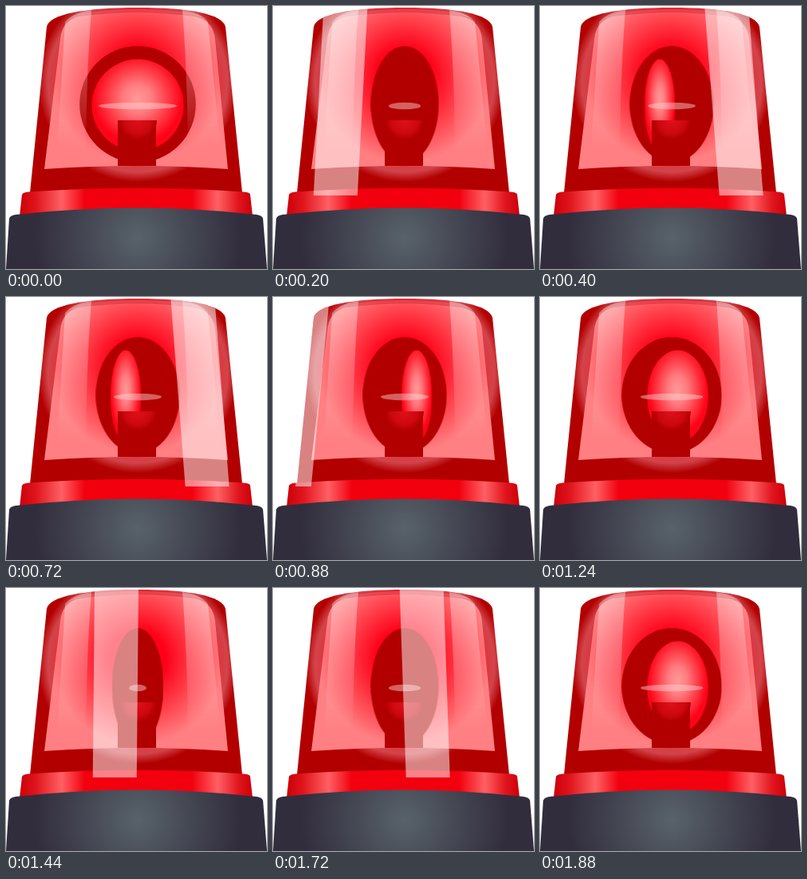
These frames come from a looping animation (327x329 px, 1920 ms). An HTML page without scripts:

```html
<!DOCTYPE html>
<html lang="en">
<head>
<meta charset="utf-8">
<title>Siren</title>
<style>
  html, body { margin: 0; width: 100%; height: 100%; overflow: hidden; background: #fff; }
  svg { display: block; width: 100vw; height: 100vh; }

  /* one turn = 8 poses of 40 ms */
  .head, .lamp, .wire, .beam { animation: 320ms infinite; }
  .head, .wire { animation-timing-function: steps(4, end); }
  .head { animation-name: head; }
  .wire { animation-name: wire; }
  .lamp { animation-name: lamp; animation-timing-function: steps(3, end); }
  .beam { animation-name: beam; animation-timing-function: step-end; }

  @keyframes head {
    0%, 100% { transform: scaleX(1); }
    50% { transform: scaleX(.445); }
  }
  @keyframes wire {
    0%, 100% { transform: scaleX(1); }
    50% { transform: scaleX(.224); }
  }
  @keyframes lamp {
    0% { transform: translateX(0) scaleX(1); }
    37.5% { transform: translateX(-22.5px) scaleX(0); animation-timing-function: step-end; }
    62.5% { transform: translateX(22.5px) scaleX(0); }
    100% { transform: translateX(0) scaleX(1); }
  }
  @keyframes beam {
    0% { opacity: 0; transform: translateX(143px) skewX(6.95deg); }
    12.5% { opacity: 1; transform: translateX(143px) skewX(6.95deg); animation-timing-function: steps(6, end); }
    87.49% { opacity: 1; transform: translateX(-143px) skewX(-8.05deg); }
    87.5%, 100% { opacity: 0; transform: translateX(-143px) skewX(-8.05deg); }
  }
</style>
</head>
<body>
<svg viewBox="0 0 327 329" preserveAspectRatio="none">
  <defs>
    <radialGradient id="body" gradientUnits="userSpaceOnUse" cx="165" cy="95" r="125">
      <stop offset=".5" stop-color="#f00012"/>
      <stop offset=".78" stop-color="#e0303a"/>
      <stop offset=".9" stop-color="#d2444a"/>
      <stop offset="1" stop-color="#b20000"/>
    </radialGradient>
    <radialGradient id="glass" gradientUnits="userSpaceOnUse" cx="165" cy="88" r="108">
      <stop offset=".32" stop-color="#ff0018"/>
      <stop offset=".65" stop-color="#ff3f4a"/>
      <stop offset="1" stop-color="#ff7f82"/>
    </radialGradient>
    <radialGradient id="bulb" cy=".43" r=".52">
      <stop offset="0" stop-color="#ff9a9a"/>
      <stop offset=".3" stop-color="#ff7c80"/>
      <stop offset=".6" stop-color="#ff424c"/>
      <stop offset=".92" stop-color="#ff0419"/>
    </radialGradient>
    <radialGradient id="ember" gradientUnits="userSpaceOnUse" cx="165" cy="143" r="24">
      <stop offset="0" stop-color="#e0101a"/>
      <stop offset=".7" stop-color="#cc080e"/>
      <stop offset="1" stop-color="#b20000"/>
    </radialGradient>
    <linearGradient id="streak" x2="0" y2="1">
      <stop offset="0" stop-color="#fff" stop-opacity=".38"/>
      <stop offset=".5" stop-color="#fff" stop-opacity=".22"/>
      <stop offset="1" stop-color="#fff" stop-opacity="0"/>
    </linearGradient>
    <linearGradient id="collar">
      <stop offset="0" stop-color="#cc0008"/>
      <stop offset=".07" stop-color="#e0141c"/>
      <stop offset=".18" stop-color="#ff6064"/>
      <stop offset=".28" stop-color="#f2000e"/>
      <stop offset=".74" stop-color="#f2000e"/>
      <stop offset=".85" stop-color="#ff6064"/>
      <stop offset=".94" stop-color="#e0141c"/>
      <stop offset="1" stop-color="#cc0008"/>
    </linearGradient>
    <radialGradient id="base" gradientUnits="userSpaceOnUse" cx="165" cy="290" r="130">
      <stop offset="0" stop-color="#58626a"/>
      <stop offset="1" stop-color="#322d3d"/>
    </radialGradient>
    <clipPath id="shell">
      <path d="M51 26C54 10 100 2 165 2S271 10 275 26L299 237H28Z"/>
    </clipPath>
  </defs>

  <path d="M51 26C54 10 100 2 165 2S271 10 275 26L296 234H30Z" fill="url(#body)"/>
  <path d="M68 42Q70 18 92 13Q165 4 236 13Q260 18 262 42L278 204Q165 196 48 204Z" fill="url(#glass)"/>
  <path d="M78 17Q90 5 165 4Q240 5 254 17Q246 10 165 9Q90 10 78 17Z" fill="#fff" opacity=".12"/>

  <g transform="translate(165 123)">
    <circle class="head" r="72.8" fill="#b20000"/>
    <circle class="lamp" cy="1" r="57.5" fill="url(#bulb)"/>
  </g>
  <path d="M140 143H188V200H140Z" fill="#b20000"/>
  <path d="M141 143H189A24 24 0 0 1 141 143Z" fill="url(#ember)"/>
  <g transform="translate(165 125)">
    <ellipse class="wire" rx="49" ry="4.3" fill="#ffd8d8" opacity=".45"/>
  </g>

  <path d="M74 20Q84 8 107 5Q101 80 100 181H64Z" fill="url(#streak)"/>
  <path d="M253 20Q244 8 221 5Q227 80 228 181H269Z" fill="url(#streak)"/>

  <path d="M20 236Q21 233 28 232.5Q165 223 298 232.5Q306 233 306 236L309 263H17Z" fill="url(#collar)"/>
  <path d="M4 266Q5 262 12 261Q165 244 314 261Q321 262 322 266L327 329H0Z" fill="url(#base)"/>

  <g clip-path="url(#shell)">
    <g transform="translate(111 2)">
      <rect class="beam" width="55" height="235" fill="#fff" fill-opacity=".51"/>
    </g>
  </g>
</svg>
</body>
</html>
```
